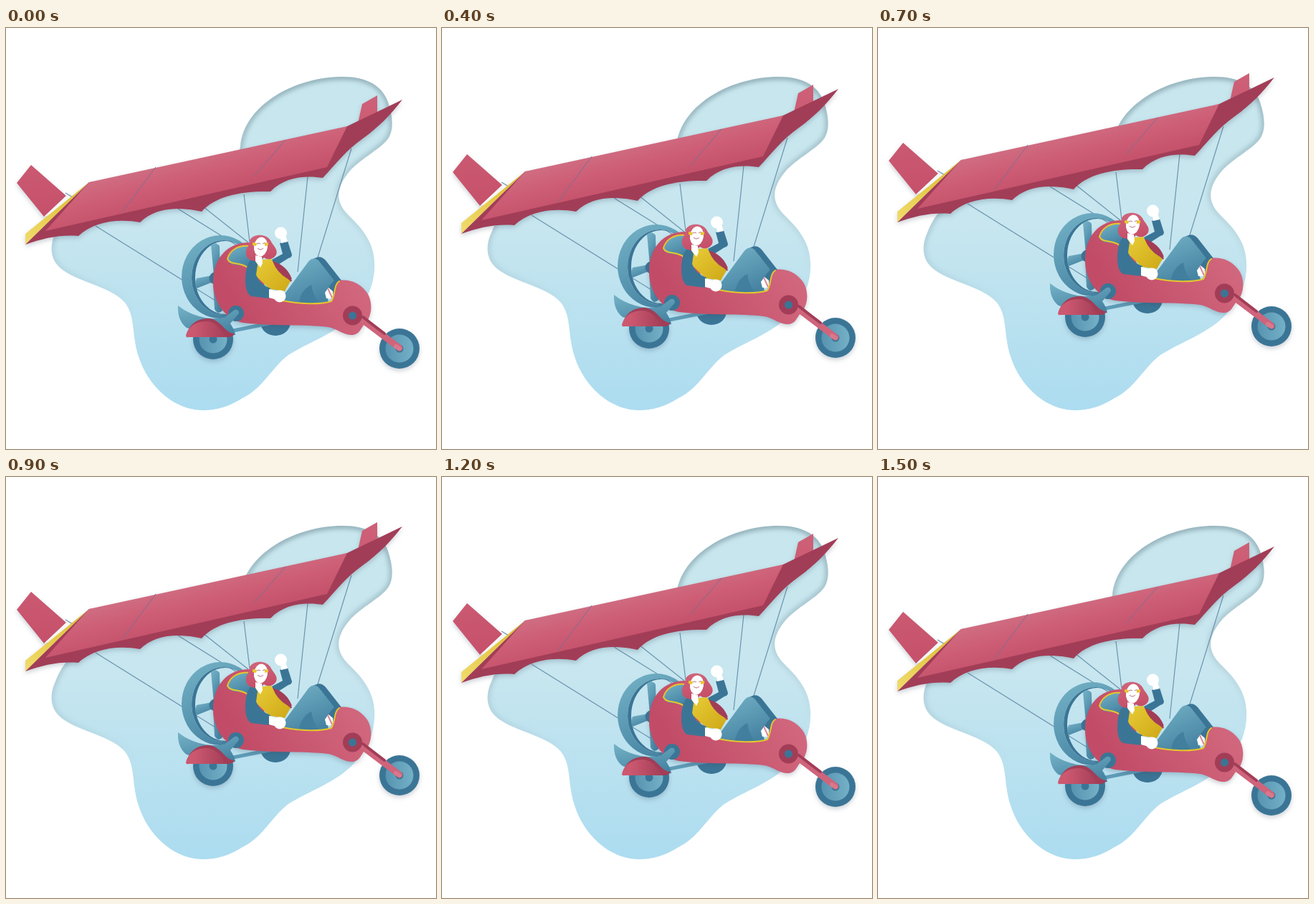
An HTML page that plays this animation: 600 px wide and 587 px high, repeating every 1600 ms.

```html
<!DOCTYPE html>
<html lang="en">
<head>
<meta charset="utf-8">
<title>Flying machine</title>
<style>
html, body { margin: 0; width: 100%; height: 100%; overflow: hidden; background: #fff; }
svg { display: block; width: 100%; height: 100%; }
.shadow { filter: drop-shadow(0 3px 3px rgba(50, 70, 95, .25)); }
.rope { fill: none; stroke: #6c94ae; stroke-width: 1.2; }
.trim { fill: none; stroke: #e6c62c; stroke-width: 2; stroke-linecap: round; }
.deep { fill: #3b7596; }
.wine { fill: #a23d57; }
.skin { fill: #fff; }
</style>
</head>
<body>
<svg viewBox="0 0 600 587">
  <defs>
    <linearGradient id="sky" gradientUnits="userSpaceOnUse" x1="0" y1="68" x2="0" y2="533">
      <stop stop-color="#c8e6ed"/><stop offset=".45" stop-color="#c7e6ef"/><stop offset="1" stop-color="#acdcf0"/>
    </linearGradient>
    <linearGradient id="rim" gradientUnits="userSpaceOnUse" x1="400" y1="68" x2="440" y2="360">
      <stop stop-color="#7f9ca6" stop-opacity=".8"/><stop offset="1" stop-color="#7f9ca6" stop-opacity="0"/>
    </linearGradient>
    <linearGradient id="pink" x2=".25" y2="1">
      <stop stop-color="#d0667c"/><stop offset="1" stop-color="#c64f69"/>
    </linearGradient>
    <linearGradient id="hull" x1=".2" y1=".8" x2="1" y2=".5">
      <stop stop-color="#c24c67"/><stop offset="1" stop-color="#d2697f"/>
    </linearGradient>
    <linearGradient id="wing" gradientUnits="userSpaceOnUse" x1="250" y1="175" x2="268" y2="245">
      <stop stop-color="#d07084"/><stop offset=".45" stop-color="#cd5e76"/><stop offset="1" stop-color="#c44f69"/>
    </linearGradient>
    <linearGradient id="fender" x1=".2" x2="1"><stop stop-color="#cc5870"/><stop offset="1" stop-color="#a23d57"/></linearGradient>
    <linearGradient id="blue" x2=".5" y2="1">
      <stop stop-color="#75b3c7"/><stop offset="1" stop-color="#4784a3"/>
    </linearGradient>
    <linearGradient id="disc"><stop stop-color="#5793b0"/><stop offset="1" stop-color="#74b1c7"/></linearGradient>
    <linearGradient id="gold" x2="1" y2="1"><stop stop-color="#e8cd37"/><stop offset="1" stop-color="#cfa817"/></linearGradient>
    <linearGradient id="lemon" x1="1" x2="0" y2="1"><stop stop-color="#dcb82a"/><stop offset="1" stop-color="#f0dc6c"/></linearGradient>
    <path id="blob" d="M327 165C332 108 402 68 470 68C508 68 526 84 533 103C540 124 541 141 534 153C524 169 490 184 476 204C461 224 460 241 475 258C493 276 512 294 514 325C516 356 504 382 480 405C456 427 425 437 394 456C372 472 358 503 330 516C311 528 294 533 275 533C235 533 198 500 185 458C175 428 181 402 166 383C149 362 104 355 80 338C61 325 60 304 69 285C78 262 90 247 112 238C180 213 320 215 327 165Z"/>
    <clipPath id="inside"><use href="#blob"/></clipPath>
    <filter id="soft"><feGaussianBlur stdDeviation="3"/></filter>
    <g id="wheel">
      <circle class="deep" r="28"/><circle r="19.5" fill="url(#disc)"/><circle class="deep" r="5.5"/>
    </g>
  </defs>

  <use href="#blob" fill="url(#sky)"/>
  <g clip-path="url(#inside)"><use href="#blob" fill="none" stroke="url(#rim)" stroke-width="8" filter="url(#soft)"/></g>

  <g id="plane">
    <path class="rope" d="M125 276L292 380M240 252L322 303M275 249L338 299M332 232L340 298M421 207L407 340M482 168L434 323M83 230L98 239"/>

    <!-- propeller -->
    <g fill-rule="evenodd">
      <path fill="url(#blue)" d="M299 289a54 58 0 1 0 .1 0ZM304 296a45 52 0 1 1-.1 0Z"/>
      <path class="deep" d="M304 296a45 52 0 1 0 .1 0ZM306 297a42 51 0 1 1-.1 0Z"/>
    </g>
    <g fill="url(#blue)">
      <path d="M286 303Q292 297 298 304L299 342L290 345Z"/>
      <path d="M288 345L266 349Q262 357 266 363L289 354Z"/>
      <path d="M289 355L291 392Q296 401 302 394L298 354Z"/>
    </g>
    <circle class="deep" cx="292" cy="349" r="8.5"/>

    <!-- far wheel and axle -->
    <ellipse class="deep" cx="376" cy="410" rx="21" ry="19"/>
    <path d="M312 423L372 411" stroke="#5f9cb7" stroke-width="5"/>

    <!-- wing -->
    <g class="shadow">
      <path fill="url(#pink)" d="M35 191L84 234L53 263L15 216ZM497 106L518 94V122L491 133Z"/>
      <path fill="#f4f6f7" d="M53 263L84 234L92 237L60 261Z"/>
      <path fill="url(#lemon)" d="M27 287L116 215L27 302Z"/>
      <path class="wine" d="M27 302L116 215L300 200L476 137L553 100C536 122 519 139 498 154C474 171 460 190 442 209C417 205 388 208 369 228C330 227 292 234 273 256C239 248 207 251 187 271C154 265 121 271 101 290C75 288 52 293 27 302Z"/>
      <path fill="url(#wing)" d="M116 215L476 137L448 194L55 283Z"/>
      <path d="M209 194L162 257M390 156L346 207" fill="none" stroke="#7c6f91"/>
    </g>

    <!-- legs -->
    <path class="deep" d="M428 323Q438 315 446 324L468 352L456 378L442 372Z"/>
    <path fill="url(#blue)" d="M382 380L421 327Q428 318 436 324L458 352Q450 360 446 369L452 387H385Z"/>
    <path fill="#427f9f" d="M426 358Q410 366 408 388H440Q428 374 426 358Z"/>
    <path class="skin" d="M450 362L456 367L457 377L447 377L445 369Z"/>
    <path d="M449 363L455 376" stroke="#d98a98" stroke-width="2"/>

    <!-- body -->
    <path class="wine" d="M372 327Q394 334 399 353L386 356Z"/>
    <g class="shadow">
      <path fill="url(#hull)" d="M340 299C308 299 290 322 289 352C288 382 306 406 331 411C370 416 419 413 449 417C465 420 469 428 484 428C493 427 495 419 500 413C512 402 512 380 503 368C493 354 476 350 466 352C459 354 460 369 455 380C438 387 408 384 386 380L362 365L352 320Z"/>
    </g>
    <path fill="url(#blue)" d="M309 324C312 310 326 301 344 304L344 334C331 328 315 334 309 324Z"/>
    <path class="trim" d="M340 304C324 302 312 310 309 322C313 331 327 326 337 334M386 380C409 385 438 386 454 381C460 372 457 358 465 353"/>

    <!-- pilot -->
    <path class="deep" d="M371 323L386 315L382 300L393 297L399 316Q399 320 394 321L375 333Z"/>
    <path class="skin" d="M384 300L383 291L390 289L393 298Z"/>
    <circle class="skin" cx="383.5" cy="286" r="8.5"/>
    <path fill="url(#gold)" d="M346 324L370 322Q380 340 397 353L389 367L368 364L349 346Z"/>
    <path class="wine" d="M372 325Q392 331 399 350L392 349Q378 341 372 325Z"/>
    <path class="deep" d="M345 320Q334 328 334 351Q334 370 342 374L367 377L369 363Q353 357 349 344L351 330Z"/>
    <path class="skin" d="M367 364L378 367V379L367 376Z"/>
    <circle class="skin" cx="382" cy="374" r="8.5"/>
    <path fill="url(#pink)" d="M340 296C345 287 362 286 369 296C372 303 380 308 377 316C373 323 365 324 360 320C355 327 337 327 335 316C333 306 340 306 340 296Z"/>
    <path class="skin" d="M348 317L357 319L358 328L355 334L348 325Z"/>
    <ellipse class="skin" cx="355.5" cy="305" rx="9.5" ry="13.5" transform="rotate(8 355.5 305)"/>
    <path fill="#e8c62e" d="M344 299l6 1l-1 4l-5-1ZM361 300l5-1v4l-5 1Z"/>
    <path d="M350 301q3-2 5 0M358 301q2-2 4-1M351 307q4 4 8 0" fill="none" stroke="#a84f63" stroke-width=".8"/>

    <!-- rear wheel -->
    <g class="shadow"><use href="#wheel" x="289" y="434"/></g>
    <circle class="deep" cx="321" cy="398" r="11"/>
    <path fill="url(#blue)" d="M240 387Q260 403 287 405L303 405L319 393Q325 392 325 398L313 412Q319 421 320 428L292 430L252 418Q239 408 240 387Z"/>
    <path class="wine" d="M252 429C255 411 270 404 284 405C302 408 304 425 319 426Q317 431 309 431Z"/>
    <path fill="url(#fender)" d="M251 429C254 415 267 408 282 409C299 412 302 427 309 431H255Q251 432 251 429Z"/>

    <!-- front wheel -->
    <g class="shadow"><use href="#wheel" x="549" y="447"/></g>
    <g stroke-linecap="round">
      <path d="M492 403L549 446" stroke="#cf647b" stroke-width="9"/>
      <path d="M498 403L528 426" stroke="#a23d57" stroke-width="4"/>
      <path d="M544 444L549 447" stroke="#d9788c" stroke-width="6"/>
    </g>
    <circle class="wine" cx="483.5" cy="401" r="13.5"/>
    <circle class="deep" cx="483.5" cy="401" r="5.5"/>
  </g>
</svg>
<script>
const plane = document.getElementById('plane');
const LOOP = 1600, STEP = 100;

// The plane climbs for half the loop and sinks back the same way, in 100 ms steps.
function draw(now) {
  const step = Math.floor(now % LOOP / STEP);
  const n = Math.min(step, LOOP / STEP - step);
  const lift = Math.round(3.1 * n + 0.18 * n * n);
  plane.setAttribute('transform', `translate(0 ${-lift})`);
  requestAnimationFrame(draw);
}
draw(performance.now());
</script>
</body>
</html>
```
